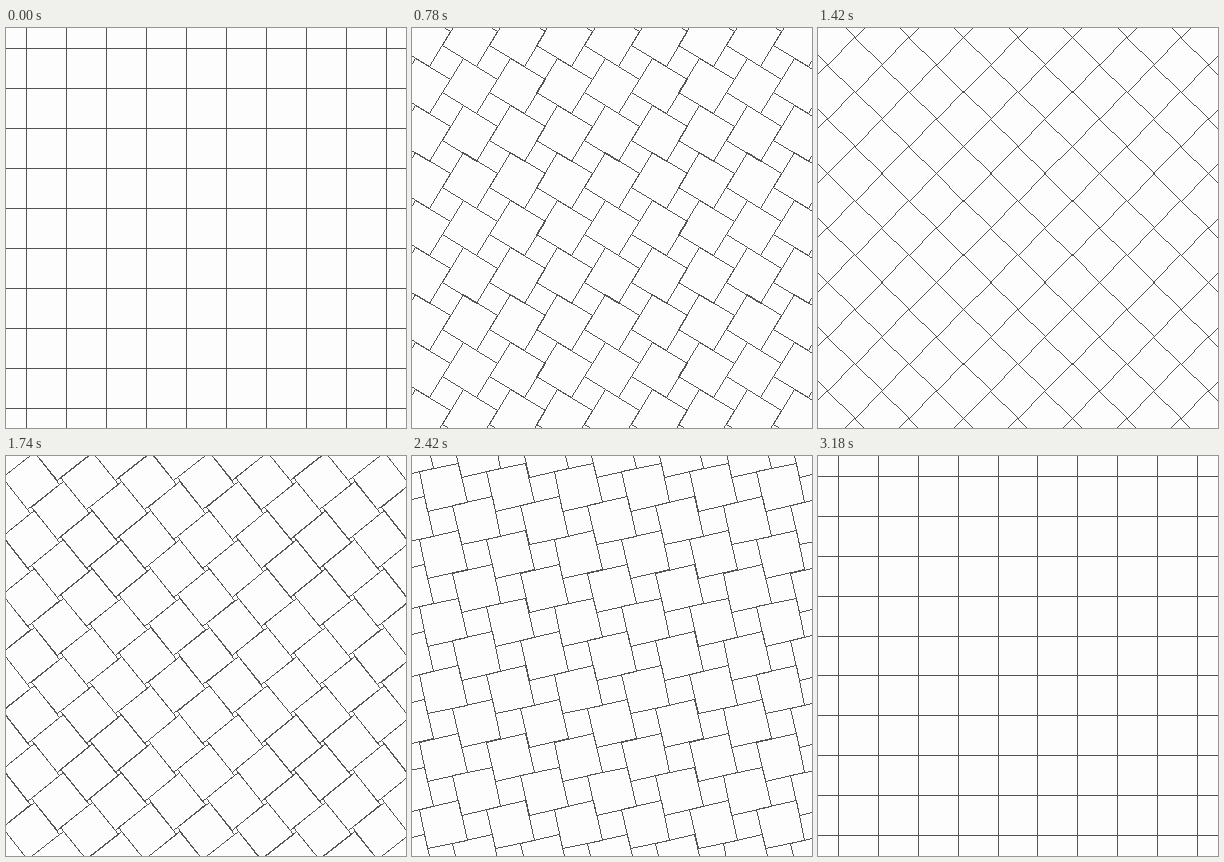
Animation, 400 px wide and 400 px high, one loop 3.2 s. Source, as an HTML page with a canvas:

```html
<!DOCTYPE html>
<html lang="en">
<head>
<meta charset="utf-8">
<title>Pythagorean tiling zoom</title>
<style>
  html, body { margin: 0; width: 100%; height: 100%; overflow: hidden; background: #fdfdfd; }
  canvas { display: block; width: 100vw; height: 100vh; image-rendering: pixelated; }
</style>
</head>
<body>
<canvas id="stage" width="400" height="400"></canvas>
<script>
const SIZE = 400, CENTER = SIZE / 2;
const LOOP = 3200, HALF = LOOP / 2, STEP = 20;
const SIDE = 40, REACH = 8;
const PAPER = 0xfffdfdfd, INK = 0xff545454;

const context = document.getElementById("stage").getContext("2d");
const image = context.createImageData(SIZE, SIZE);
const pixels = new Uint32Array(image.data.buffer);

// Bresenham line between whole pixels, without antialiasing.
function drawLine([x, y], [endX, endY]) {
  const dx = Math.abs(endX - x), dy = -Math.abs(endY - y);
  const stepX = Math.sign(endX - x), stepY = Math.sign(endY - y);
  let error = dx + dy;
  while (true) {
    if (x >= 0 && x < SIZE && y >= 0 && y < SIZE) pixels[y * SIZE + x] = INK;
    if (x === endX && y === endY) return;
    const doubled = 2 * error;
    if (doubled >= dy) { error += dy; x += stepX; }
    if (doubled <= dx) { error += dx; y += stepY; }
  }
}

function rotate(x, y, degrees) {
  const radians = degrees * Math.PI / 180;
  const cos = Math.cos(radians), sin = Math.sin(radians);
  return [x * cos - y * sin, x * sin + y * cos];
}

const toPixel = value => Math.floor(CENTER + value + 1e-6);

// Each half turns the squares by 45 degrees while the lattice grows by sqrt(2);
// the gaps between the squares become tiles of equal size.
function render(time) {
  const progress = (time % HALF) / HALF;
  const angle = 45 * Math.sin(progress * Math.PI / 2);
  const pitch = SIDE * 2 ** (progress / 2);
  const half = pitch * Math.cos(angle * Math.PI / 180) / 2;
  const turn = time < HALF ? 0 : 45;
  const offsets = [[-half, -half], [half, -half], [half, half], [-half, half]]
    .map(([x, y]) => rotate(x, y, angle + turn));

  pixels.fill(PAPER);
  for (let row = -REACH; row <= REACH; row++) {
    for (let col = -REACH; col <= REACH; col++) {
      const [x, y] = rotate(col * pitch, row * pitch, turn);
      const corners = offsets.map(([dx, dy]) => [toPixel(x + dx), toPixel(y + dy)]);
      corners.forEach((corner, i) => drawLine(corner, corners[(i + 1) % 4]));
    }
  }
  context.putImageData(image, 0, 0);
}

const start = performance.now();
let shown = -1;

function tick() {
  const elapsed = (performance.now() - start) % LOOP;
  const time = Math.floor(elapsed / STEP) * STEP;
  if (time !== shown) render(shown = time);
  requestAnimationFrame(tick);
}
tick();
</script>
</body>
</html>
```
